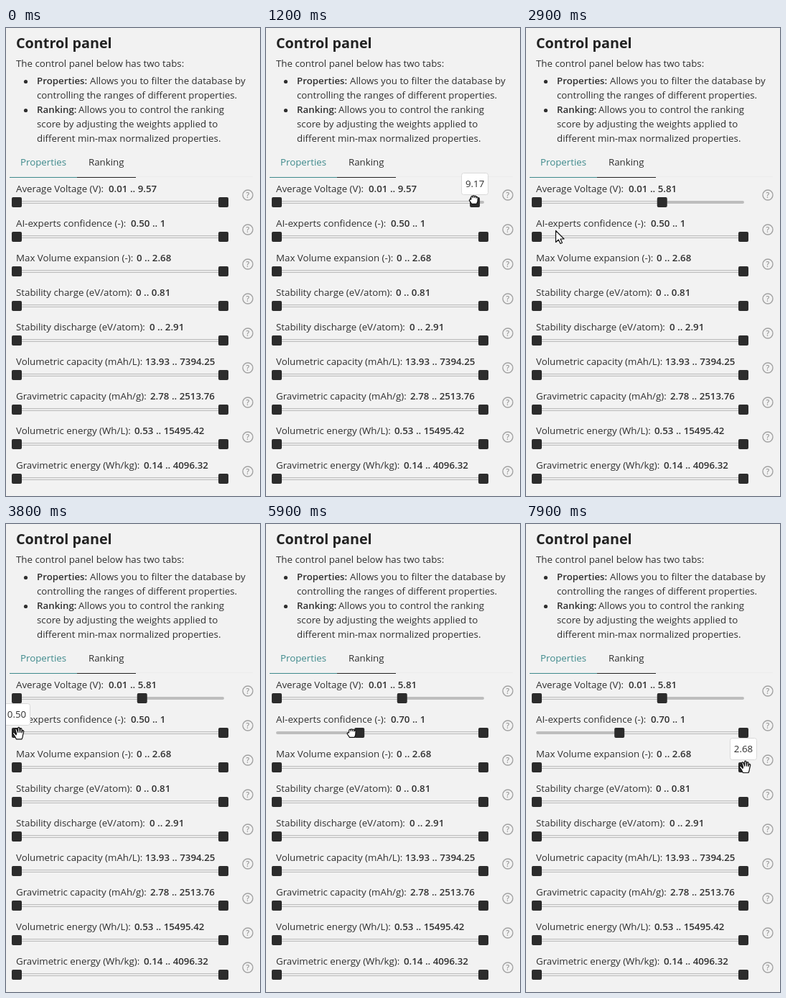
An HTML page that plays this animation: 354 px wide and 650 px high, repeating every 8000 ms.

```html
<!DOCTYPE html>
<html lang="en">
<head>
<meta charset="utf-8">
<title>Control panel</title>
<style>
html, body { margin: 0; width: 100%; height: 100%; overflow: hidden; background: #f2f2f2; }
svg { display: block; width: 354px; height: 650px; }
text { font: 13.3px "Open Sans", "Noto Sans", sans-serif; fill: #2f2f2f; white-space: pre; }
text.b { font-weight: 600; }
text.title { font-size: 19.8px; font-weight: 700; fill: #222; }
text.teal { fill: #3f8a8c; }
text.mid { text-anchor: middle; }
text.help { font-size: 10.5px; font-weight: 600; fill: #9b9b9b; }
</style>
</head>
<body>
<svg id="stage" viewBox="0 0 354 650"></svg>
<script>
const LOOP = 8000, X0 = 15, SPAN = 288;
const stage = document.getElementById("stage");

function add(tag, attrs, parent = stage) {
  const el = document.createElementNS("http://www.w3.org/2000/svg", tag);
  for (const k in attrs) el.setAttribute(k, attrs[k]);
  parent.appendChild(el);
  return el;
}
function text(x, y, str, cls = "", parent = stage) {
  const el = add("text", { x, y, class: cls }, parent);
  el.textContent = str;
  return el;
}
const rect = (x, y, width, height, fill, rx = 0, parent = stage) =>
  add("rect", { x, y, width, height, fill, rx }, parent);

// Heading and notes
text(14, 28, "Control panel", "title");
text(14, 54, "The control panel below has two tabs:");
for (const cy of [74.5, 114.5]) add("circle", { cx: 27.5, cy, r: 2.6, fill: "#2f2f2f" });
text(43, 78, "Properties:", "b");
text(117, 78, "Allows you to filter the database by");
text(43, 98, "controlling the ranges of different properties.");
text(43, 118, "Ranking:", "b");
text(101, 118, "Allows you to control the ranking");
text(43, 138, "score by adjusting the weights applied to");
text(43, 158, "different min-max normalized properties.");

// Tabs
text(20, 191, "Properties", "teal");
text(115, 191, "Ranking");
rect(181, 206, 163, 1, "#ececec");
rect(5, 207, 94, 1, "#3f8a8c");
rect(99, 207, 82, 1, "#222");
rect(353, 562, 1, 88, "#fbfbfb");

// Sliders: label, value x, low, high
const sliders = [
  ["Average Voltage (V):", 143, "0.01", "9.57"],
  ["AI-experts confidence (-):", 174, "0.50", "1"],
  ["Max Volume expansion (-):", 182, "0", "2.68"],
  ["Stability charge (eV/atom):", 181, "0", "0.81"],
  ["Stability discharge (eV/atom):", 200, "0", "2.91"],
  ["Volumetric capacity (mAh/L):", 194, "13.93", "7394.25"],
  ["Gravimetric capacity (mAh/g):", 201, "2.78", "2513.76"],
  ["Volumetric energy (Wh/L):", 179, "0.53", "15495.42"],
  ["Gravimetric energy (Wh/kg):", 192, "0.14", "4096.32"]
].map(([label, vx, low, high], i) => {
  const y = 242 + i * 48;
  text(14, y - 14, label);
  const value = text(vx, y - 14, "", "b");
  rect(14, y - 2, 290, 4, "#bdbdbd", 2);
  const track = rect(X0, y - 1, SPAN, 2, "#ebebeb");
  const knobs = [0, 1].map(() => rect(0, y - 7, 14, 14, "#2c2c2c", 2));
  add("circle", { cx: 337, cy: y - 10, r: 7, fill: "none", stroke: "#a2a2a2", "stroke-width": 1.4 });
  text(337, y - 6, "?", "help mid");
  return {
    show(a, b, lo = low, hi = high) {
      const xa = X0 + a * SPAN, xb = X0 + b * SPAN;
      value.textContent = lo + " .. " + hi;
      track.setAttribute("x", xa);
      track.setAttribute("width", xb - xa);
      knobs[0].setAttribute("x", xa - 7);
      knobs[1].setAttribute("x", xb - 7);
    }
  };
});
sliders.forEach(s => s.show(0, 1));

// Tooltip
const tip = add("g", {});
add("rect", { x: -18.5, y: -40.5, width: 37, height: 30, rx: 3, fill: "#fff", stroke: "#d9d9d9" }, tip);
const tipText = text(0, -21, "", "mid", tip);

// Cursors, each centred or tipped on its hot spot
const ink = { fill: "#fff", stroke: "#111", "stroke-width": 1.2, "stroke-linejoin": "round" };
const pointer = add("g", {});
const shape = (d, shift) => add("path", { d, transform: `translate(${shift})`, ...ink }, pointer);
const shapes = {
  arrow: shape("M.5.5V16.5L4.3 13 7 18.5 9.5 17.3 7 12H12Z", "0 0"),
  hand: shape("M5.6 11.5L3.3 8.6Q1.4 7.5.8 9.3L4.2 14.2Q5 16 6 17.5H13.5Q15 14.5 15 12L16.2 7Q16.2 5 14.7 5.4L13.4 8.6 13.6 4Q13 2 11.6 3L11 8.2 10.3 1.9Q9.2.3 8.2 1.9L8.3 8.2 6.4 3.5Q4.8 2 4.2 4L6 9.5Z", "-8.5 -9"),
  fist: shape("M3 6.5Q.5 6 .7 8L4 12.8H10.8Q12.8 10 12.6 4.5Q12.2 2.6 10.4 2.9Q9.5 1.2 8 2Q6.5.7 5.4 2Q3.2 1.3 3.2 3.8ZM5.6 2.5V4.5M8 2.5V4.5M10.3 3.2V5", "-6.5 -6.5")
};

// Pointer path: time, x, y
const path = [
  [300, 366, 300], [600, 301, 238], [1050, 301, 238], [1800, 189, 239], [2250, 189, 239],
  [2900, 41, 281], [3550, 17, 290], [4250, 17, 291], [4500, 30, 291], [5800, 119, 290],
  [6150, 119, 290], [7250, 303, 337], [7500, 305, 337]
];
function pointerAt(t) {
  if (t <= path[0][0]) return path[0].slice(1);
  for (let i = 1; i < path.length; i++) {
    const [t0, x0, y0] = path[i - 1], [t1, x1, y1] = path[i];
    if (t > t1) continue;
    const u = (t - t0) / (t1 - t0), k = u * u * (3 - 2 * u);
    return [x0 + (x1 - x0) * k, y0 + (y1 - y0) * k];
  }
  return path[path.length - 1].slice(1);
}
const within = (t, a, b) => t >= a && t < b;

function draw(t) {
  const [x, y] = pointerAt(t);

  // The first slider follows the drag; the second snaps to steps of 0.1
  const volts = t < 1050 ? 9.57 : t >= 1800 ? 5.81 : 5.81 + 3.76 * (x - 189) / 112;
  const upper = (volts - 0.01) / 9.56;
  const steps = t < 4250 ? 0 : Math.min(2, Math.max(0, Math.round((x - X0) / 57.6)));
  const conf = t >= 5800 ? 2 : steps;
  sliders[0].show(0, upper, "0.01", t < 1850 ? "9.57" : "5.81");
  sliders[1].show(conf / 5, 1, t < 5850 ? "0.50" : "0.70");

  let mark = null;
  if (within(t, 600, 2250)) mark = [X0 + upper * SPAN, 242, volts.toFixed(2)];
  else if (within(t, 3650, 5850)) mark = [X0 + conf / 5 * SPAN, 290, (0.5 + conf / 10).toFixed(2)];
  else if (t >= 7350) mark = [X0 + SPAN, 338, "2.68"];
  tip.style.display = mark ? "" : "none";
  if (mark) {
    tip.setAttribute("transform", `translate(${mark[0]} ${mark[1]})`);
    tipText.textContent = mark[2];
  }

  const closed = within(t, 1050, 1850) || within(t, 4200, 6000);
  const kind = closed ? "fist" : mark ? "hand" : "arrow";
  for (const k in shapes) shapes[k].style.display = k === kind ? "" : "none";
  pointer.setAttribute("transform", `translate(${x} ${y})`);
}

function tick(now) {
  draw(now % LOOP);
  requestAnimationFrame(tick);
}
draw(0);
requestAnimationFrame(tick);
</script>
</body>
</html>
```
